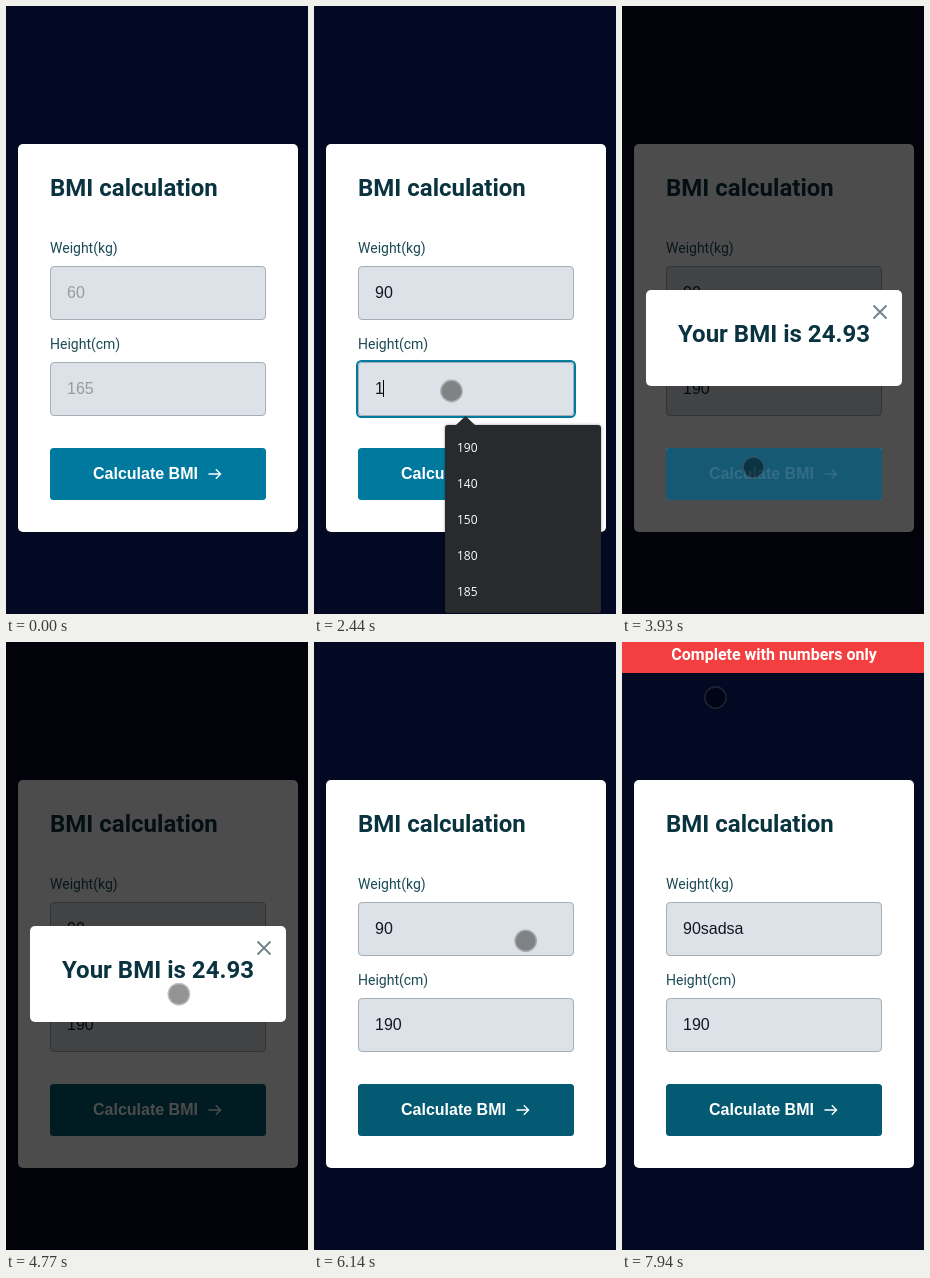
Animation of 302 by 608 pixels, one loop 8 s. Source, as an HTML page with a canvas:

```html
<!DOCTYPE html>
<html lang="en">
<head>
<meta charset="utf-8">
<title>BMI calculation</title>
<style>
html, body { margin: 0; width: 100%; height: 100%; overflow: hidden; background: #030823; }
canvas { display: block; }
</style>
</head>
<body>
<canvas id="stage" width="302" height="608"></canvas>
<script>
const ctx = document.getElementById('stage').getContext('2d');
const LOOP = 8000;
const ROBOTO = 'Roboto, sans-serif';
const ARIAL = '"Liberation Sans", Arial, sans-serif';
const OPEN = '"Open Sans", sans-serif';

const fields = [
  { y: 260, label: 'Weight(kg)', hint: '60', known: ['90', '8', '4', '50', '40', 'dsadas'],
    typed: [{ keys: '90', from: 1420, every: 200 }, { keys: 'sadsa', from: 6550, every: 68 }] },
  { y: 356, label: 'Height(cm)', hint: '165', known: ['190', '140', '150', '180', '185'],
    typed: [{ keys: '190', from: 2440, every: 330 }] }
];
const [weight, height] = fields;
const button = {}, close = {};

// the pointer's visits; a bend is the control point of a curved way
const visits = [
  { on: weight, to: [129, 284.5], leave: 70, arrive: 520, click: 720 },
  { on: height, to: [137.5, 385], leave: 1620, arrive: 1960, click: 2100 },
  { on: button, to: [131.5, 461.5], leave: 2950, arrive: 3250, click: 3660 },
  { on: close, to: [256.5, 305.5], leave: 3940, arrive: 5470, click: 5870, bend: [135, 340] },
  { on: weight, to: [140, 288], leave: 5950, arrive: 6400, click: 6500 },
  { on: button, to: [162, 472], leave: 6860, arrive: 7110, click: 7270 },
  { to: [93.5, 55.5], leave: 7400, arrive: 7900, click: Infinity }
];
const entry = [190, 261];
const answer = visits[2].click + 60, dismiss = visits[3].click, failure = visits[5].click + 20;

const ramp = (t, from, span) => Math.min(1, Math.max(0, (t - from) / span));
const ease = k => k * k * (3 - 2 * k);
const mix = (a, b, k) => a + (b - a) * k;
const lastClick = t => visits.findLast(v => v.click <= t);

function text(str, x, y, font, color, align = 'left') {
  ctx.font = font;
  ctx.fillStyle = color;
  ctx.textAlign = align;
  ctx.fillText(str, x, y);
}

function box(x, y, w, h, r, fill, stroke, line = 1) {
  ctx.beginPath();
  ctx.roundRect(x, y, w, h, r);
  if (fill) { ctx.fillStyle = fill; ctx.fill(); }
  if (stroke) { ctx.strokeStyle = stroke; ctx.lineWidth = line; ctx.stroke(); }
}

function lines(d, color, width) {
  ctx.strokeStyle = color;
  ctx.lineWidth = width;
  ctx.stroke(new Path2D(d));
}

function content(field, t) {
  let value = '', changed = 0;
  for (const { keys, from, every } of field.typed) {
    if (t < from) continue;
    const n = Math.min(keys.length, Math.floor((t - from) / every) + 1);
    value += keys.slice(0, n);
    changed = from + (n - 1) * every;
  }
  return { value, changed };
}

function drawField(field, t) {
  const { y, label, hint } = field;
  const { value, changed } = content(field, t);
  const click = lastClick(t);
  const active = click?.on === field;
  text(label, 44, y - 13, '14px ' + ROBOTO, '#1a4a55');
  box(44.5, y + .5, 215, 53, 3.5, '#dce2e7', '#a5afb7');
  if (active) box(43, y - 1, 218, 56, 4.5, null, '#007a9f', 2);
  text(value || hint, 61, y + 32, '16px ' + ARIAL, value ? '#10181f' : '#989b9d');
  if (active && (t - Math.max(changed, click.click)) % 1000 < 500) {
    const end = value ? ctx.measureText(value).width : 0;
    ctx.fillStyle = '#000';
    ctx.fillRect(Math.floor(61 + end), y + 18, 1, 17);
  }
}

// suggestions that still continue what has been typed
function drawMenu(field, t) {
  if (lastClick(t - 40)?.on !== field || lastClick(t).on !== field) return;
  const { value } = content(field, t);
  const items = field.known.includes(value) ? [] : field.known.filter(s => s.startsWith(value));
  if (!items.length) return;
  const y = field.y + 63;
  ctx.shadowColor = 'rgba(0,0,0,.4)';
  ctx.shadowBlur = 3;
  box(131, y, 156, 8 + 36 * items.length, 3, '#292a2d');
  ctx.shadowBlur = 0;
  ctx.fill(new Path2D(`M142 ${y}L151.5 ${y - 9}L161 ${y}Z`));
  items.forEach((s, i) => text(s, 143, y + 27 + i * 36, '500 12px ' + OPEN, '#fff'));
}

function drawButton(t) {
  const i = visits.indexOf(lastClick(t));
  const shade = v => v?.on === button || v?.on === close ? 1 : 0;
  const k = i < 0 ? 0 : mix(shade(visits[i - 1]), shade(visits[i]), ramp(t, visits[i].click, 180));
  box(44, 442, 216, 52, 3.5, `rgb(${mix(0, 3, k)},${mix(121, 90, k)},${mix(159, 114, k)})`);
  text('Calculate BMI', 87, 473, 'bold 16px ' + ARIAL, '#fff');
  lines('M202.5 468H214.5M209.8 463.2L214.6 468L209.8 472.8', '#fff', 1.3);
}

function drawModal(t) {
  const shown = ramp(t, answer, 200) - ramp(t, dismiss, 190);
  if (shown <= 0) return;
  ctx.globalAlpha = shown;
  ctx.fillStyle = 'rgba(0,0,0,.7)';
  ctx.fillRect(0, 0, 302, 608);
  ctx.fillStyle = `rgba(36,130,170,${.6 * (1 - ramp(t, answer + 270, 400))})`;
  ctx.fillRect(44, 442, 216, 52);
  box(24, 284, 256, 96, 5, '#fff');
  text('Your BMI is 24.93', 56, 336, 'bold 24px ' + ROBOTO, '#0a3340');
  lines('M251.5 299.5L264.5 312.5M264.5 299.5L251.5 312.5', '#71868b', 2);
  ctx.globalAlpha = 1;
}

function drawBanner(t) {
  const y = -31 * (1 - ease(ramp(t, failure, 230)));
  if (y <= -31) return;
  ctx.fillStyle = '#f33f40';
  ctx.fillRect(0, y, 302, 31);
  text('Complete with numbers only', 152, y + 18, 'bold 16px ' + ROBOTO, '#fff', 'center');
}

function drawPointer(t) {
  const i = visits.findLastIndex(v => v.leave <= t);
  if (i < 0) return;
  const { to, leave, arrive, bend } = visits[i];
  const from = i ? visits[i - 1].to : entry;
  const k = ease(ramp(t, leave, arrive - leave));
  const [x, y] = from.map((a, n) => {
    const c = bend ? bend[n] : (a + to[n]) / 2;
    return mix(mix(a, c, k), mix(c, to[n], k), k);
  });
  const pressed = visits.some(v => t >= v.click - 140 && t < v.click + 60);
  box(x - 10, y - 10, 20, 20, 10, pressed ? 'rgba(171,170,0,.69)' : 'rgba(0,0,0,.42)');
  box(x - 10.6, y - 10.6, 21.2, 21.2, 10.6, null,
    pressed ? 'rgba(195,187,0,.7)' : 'rgba(82,82,82,.36)', 1.6);
}

function draw(t) {
  ctx.fillStyle = '#030823';
  ctx.fillRect(0, 0, 302, 608);
  box(12, 138, 280, 388, 5, '#fff');
  text('BMI calculation', 44, 190, 'bold 24px ' + ROBOTO, '#0a3340');
  fields.forEach(f => drawField(f, t));
  drawButton(t);
  drawBanner(t);
  drawModal(t);
  drawPointer(t);
  fields.forEach(f => drawMenu(f, t));
}

let start;
function tick(now) {
  start ??= now;
  draw(Math.max(0, now - start) % LOOP);
  requestAnimationFrame(tick);
}
draw(0);
requestAnimationFrame(tick);
</script>
</body>
</html>
```
